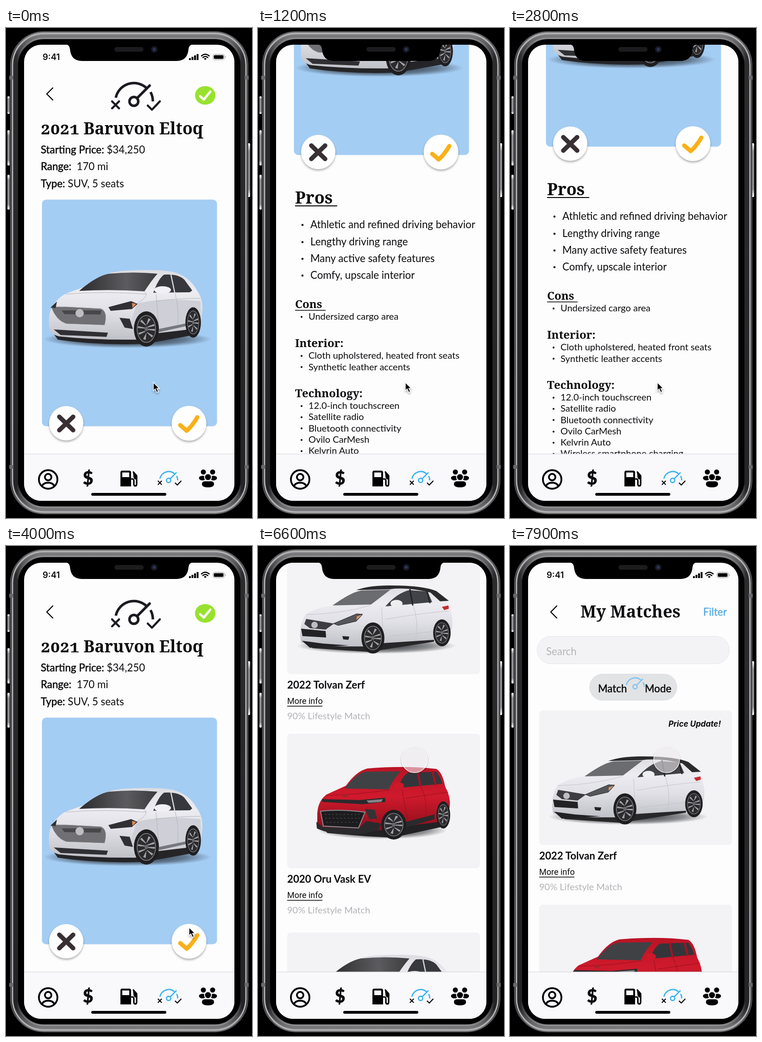
An HTML page that plays this animation: 531 by 1055 pixels, repeating every 8000 ms.

```html
<!DOCTYPE html>
<html lang="en">
<head>
<meta charset="utf-8">
<title>Car match</title>
<style>
html, body { margin: 0; width: 100%; height: 100%; overflow: hidden; background: #000; }
svg { display: block; width: 531px; height: 1055px; }
text { font: 22.3px Lato, sans-serif; fill: #0c0c0e; white-space: pre; }
.med { stroke: #0c0c0e; stroke-width: .55px; }
.title { font: 700 35.5px "Noto Serif", serif; font-variant-numeric: oldstyle-nums; }
.big { font: 700 36px "Noto Serif", serif; }
.sub { font: 700 24px "Noto Serif", serif; }
.item, .dim { font-size: 20px; }
.dim { fill: #b3b3b7; }
.name { font-weight: 700; }
.more { font: 18px Roboto, sans-serif; }
.time { font: 600 18.5px Inter, sans-serif; }
.badge { font: italic 700 17px Inter, sans-serif; }
.line { fill: none; stroke: currentColor; stroke-linecap: round; stroke-linejoin: round; }
.soft { filter: drop-shadow(0 3px 2px rgba(0, 0, 0, .3)); }

.first, .second, .third, .arrow, .touch { animation: 8s step-end infinite; }
.first, .arrow { animation-name: first; }
.second { animation-name: second; }
.third { animation-name: third; }
.touch { animation-name: touch; }
.scroll-a, .scroll-c, .move-arrow, .move-touch { animation: 8s ease-in-out infinite; }
.scroll-a { animation-name: scroll-a; }
.scroll-c { animation-name: scroll-c; }
.move-arrow { animation-name: move-arrow; }
.move-touch { animation-name: move-touch; }

@keyframes first { 0% { opacity: 1 } 56.25%, 100% { opacity: 0 } }
@keyframes second { 0% { opacity: 0 } 56.25% { opacity: 1 } 72.5%, 100% { opacity: 0 } }
@keyframes third { 0% { opacity: 0 } 72.5%, 100% { opacity: 1 } }
@keyframes touch { 0% { opacity: 0 } 56.25%, 100% { opacity: 1 } }
@keyframes scroll-a {
  0%, 4% { transform: translateY(0) }
  14.5%, 16% { transform: translateY(-584px) }
  22%, 36% { transform: translateY(-602px) }
  46%, 100% { transform: translateY(0) }
}
@keyframes scroll-c {
  0%, 76% { transform: translateY(0) }
  82%, 88% { transform: translateY(-368px) }
  97%, 100% { transform: translateY(0) }
}
@keyframes move-arrow {
  0%, 43% { transform: translate(318px, 763px) }
  49%, 100% { transform: translate(395px, 821px) }
}
@keyframes move-touch {
  0%, 60% { transform: translate(395px, 850px) }
  68%, 73% { transform: translate(425px, 163px) }
  76%, 100% { transform: translate(338px, 460px) }
}
</style>
</head>
<body>
<svg viewBox="0 0 531 1055">
<defs>
  <clipPath id="screen"><rect x="39" y="36" width="454" height="982" rx="37"/></clipPath>
  <linearGradient id="rim" x2="0" y2="1">
    <stop stop-color="#8a8a8c"/><stop offset=".05" stop-color="#2c2c2e"/>
    <stop offset=".95" stop-color="#242426"/><stop offset="1" stop-color="#8a8a8c"/>
  </linearGradient>
  <linearGradient id="key" x2="0" y2="1">
    <stop stop-color="#fff"/><stop offset=".15" stop-color="#8b8b8d"/>
    <stop offset=".85" stop-color="#8b8b8d"/><stop offset="1" stop-color="#fff"/>
  </linearGradient>
  <linearGradient id="glass" x2="1" y2="0">
    <stop stop-color="#2b2b2d"/><stop offset=".6" stop-color="#5c5c60"/><stop offset="1" stop-color="#3b3b3e"/>
  </linearGradient>
  <linearGradient id="white" x2="0" y2="1">
    <stop stop-color="#dcdce1"/><stop offset=".3" stop-color="#ececf1"/>
    <stop offset=".6" stop-color="#e0e0e6"/><stop offset="1" stop-color="#c0c0c8"/>
  </linearGradient>
  <linearGradient id="red" x2="0" y2="1">
    <stop stop-color="#b91425"/><stop offset=".45" stop-color="#cf1a2c"/><stop offset="1" stop-color="#860d1a"/>
  </linearGradient>
  <radialGradient id="shade">
    <stop stop-color="#15181c" stop-opacity=".95"/><stop offset=".7" stop-color="#15181c" stop-opacity=".45"/>
    <stop offset="1" stop-color="#15181c" stop-opacity="0"/>
  </radialGradient>

  <g id="wheel">
    <ellipse rx="27" ry="38" fill="#1f1f22"/>
    <ellipse rx="20" ry="29" fill="#2b2b2e" stroke="#85858b" stroke-width="1.500"/>
    <ellipse rx="11" ry="16" fill="none" stroke="#a2a2a8" stroke-width="15" stroke-dasharray="3 8"/>
    <ellipse rx="4" ry="5" fill="#68686c"/>
  </g>

  <g id="sedan">
    <ellipse cx="262" cy="670" rx="182" ry="19" fill="url(#shade)"/>
    <path fill="#252528" d="M98 652L112 671Q200 684 300 680L400 662V640Z"/>
    <path fill="url(#white)" d="M93 643Q91 618 98 603 108 585 126 573 145 566 168 558 205 527 250 523 320 518 360 525 396 534 412 565 424 580 424 605L421 640 387 650 328 657 280 671Q190 672 115 664 95 660 93 643Z"/>
    <path fill="#cfcfd7" d="M282 594Q330 580 420 588L421 640 387 649 328 656 280 670 268 640Z"/>
    <path fill="url(#glass)" d="M158 566Q195 534 222 529 275 524 327 529 313 545 299 567 230 562 158 566Z"/>
    <path fill="#37383e" d="M318 570Q328 541 341 531 372 529 385 542L402 565 397 569Z"/>
    <path class="line" color="#d9d9e0" stroke-width="2.500" d="M356 531L364 569"/>
    <path class="line" color="#b4b4bd" d="M128 573Q210 566 303 573M299 569Q312 575 282 594M323 588Q370 582 419 582M324 574L330 646M365 572Q375 605 370 645"/>
    <path fill="#77777f" d="M330 648L388 636V642L330 655Z"/>
    <ellipse cx="338" cy="564" rx="18" ry="8" fill="#f1f1f5"/>
    <path fill="#707074" stroke="#c9c9ce" d="M97 600L130 600 205 604Q221 611 213 640L130 637Q108 630 97 600Z"/>
    <path fill="#48484b" d="M120 608H206L204 617 126 616Z"/>
    <path fill="#303034" d="M221 601L270 588 284 594 272 605 226 609ZM96 602L110 589 107 603ZM245 624L267 626 274 648 256 645ZM103 649L220 656 217 665 118 661Z"/>
    <path fill="#e58a55" d="M272 592L281 594 273 603Z"/>
    <circle cx="159" cy="614" r="9" fill="#bdbdc3"/>
    <use href="#wheel" transform="translate(303 648)"/>
    <use href="#wheel" transform="translate(404 634) scale(.62 .86)"/>
  </g>

  <g id="hatch">
    <ellipse cx="255" cy="675" rx="172" ry="17" fill="url(#shade)"/>
    <path fill="#27272a" d="M96 660L118 680 240 688 380 666V650Z"/>
    <path fill="url(#white)" d="M91 655Q90 625 104 606 130 592 160 588L187 575Q220 553 250 548 310 542 350 549 388 556 405 575 415 588 416 600 422 620 418 640L380 662 272 669 240 676Q130 678 93 668Z"/>
    <path fill="#2a2a2d" d="M212 555Q240 544 290 545 355 545 385 557L412 578 393 579 372 560Q320 548 285 553Z"/>
    <path fill="#6b6c70" d="M161 588Q200 560 222 556L286 554Q265 570 244 586Z"/>
    <path fill="#424348" d="M275 590Q300 561 327 555L366 558 376 581Z"/>
    <path class="line" color="#222" stroke-width="3" d="M328 554L334 587M365 558L371 582"/>
    <path class="line" color="#c3c3c9" d="M104 608Q180 606 242 588M267 593L270 662M335 588Q348 625 340 662M275 618Q340 606 410 600M280 655L378 644"/>
    <ellipse cx="299" cy="584" rx="13" ry="8" fill="#eeeef1"/>
    <path fill="#3d3d41" d="M104 617L164 627 146 640 112 637 100 628Z"/>
    <path fill="#222225" d="M93 638L146 643 147 657 96 654ZM95 664L140 670 196 674 112 679ZM182 654L197 655 195 662 184 661Z"/>
    <path fill="#55565a" stroke="#222" d="M163 627L213 606 226 607 212 622 173 631Z"/>
    <path fill="#e09a66" d="M213 612L224 608 213 619Z"/>
    <path fill="#c52c30" d="M397 591L411 588 412 595 402 598Z"/>
    <circle cx="122" cy="630" r="7" fill="#bdbdc3"/>
    <use href="#wheel" transform="translate(248 658) scale(.92 .88)"/>
    <use href="#wheel" transform="translate(397 647) scale(.7 .76)"/>
  </g>

  <g id="boxy">
    <ellipse cx="268" cy="612" rx="140" ry="19" fill="url(#shade)"/>
    <path fill="#222225" d="M127 594L150 618 235 625 290 628 405 603V575Z"/>
    <path fill="url(#red)" d="M128 575Q130 548 148 535L190 516Q212 485 236 479 320 472 385 480 398 487 404 518 416 540 414 560L408 592 318 603 230 617Q170 622 128 604Z"/>
    <path fill="#404145" d="M187 522Q212 490 232 486L308 485Q290 505 282 524Z"/>
    <path fill="#34353a" d="M302 521Q312 493 325 488L385 486Q395 500 398 512Z"/>
    <path class="line" color="#a91222" stroke-width="4" d="M345 487L351 517M377 487L384 514"/>
    <path class="line" color="#93101e" d="M148 537Q220 535 284 525M311 525L323 591M352 519Q368 550 361 587M319 543L410 530"/>
    <ellipse cx="304" cy="516" rx="11" ry="7" fill="#cf182a"/>
    <path fill="#2a2a2d" d="M126 594L140 605 218 608 234 592 266 598 260 612 225 620Q160 624 127 608ZM319 594L381 578V588L319 606ZM138 545L220 547 274 542 275 551 226 556 139 551Z"/>
    <path fill="#1c1c1f" stroke="#8b8b90" stroke-width="2" d="M135 571Q175 566 231 573L217 607 141 603Z"/>
    <path class="line" color="#3b3b40" stroke-width="2" stroke-dasharray="2 6" d="M145 578H220M146 586H219M148 595H216"/>
    <path fill="#85848a" d="M234 548L270 545 266 551 239 553Z"/>
    <path fill="#333336" d="M231 566L252 568 257 587 240 588Z"/>
    <ellipse cx="188" cy="538" rx="6" ry="3" fill="#9f2630"/>
    <use href="#wheel" transform="translate(293 600) scale(1 .84)"/>
    <use href="#wheel" transform="translate(400 579) scale(.55 .77)"/>
  </g>

  <g id="gauge" class="line" stroke-width="5.5">
    <path stroke-linecap="butt" d="M-39 -8A40 40 0 0 1 27 -29M36 -20A41 41 0 0 1 41 0"/>
    <circle r="9.5"/>
    <path d="M7 -7L34 -34"/>
  </g>
  <path id="votes-mini" class="line" stroke-width="4.5" d="M-47 0L-32 15M-32 0L-47 15M30 9L39 18 56 0"/>

  <g id="status">
    <text class="time" x="79" y="69">9:41</text>
    <path d="M395 65h4v4h-4zM400.500 62h4v7h-4zM406 59h4v10h-4zM411.500 56h4v13h-4z"/>
    <path class="line" stroke-width="2.600" stroke-linecap="butt" d="M422 60Q430 53 438.500 60M425 63.500Q430 59 435.500 63.500"/>
    <path d="M427 66Q430 63.500 433 66L430 69Z"/>
    <rect x="446.500" y="56.500" width="25" height="12" rx="4" fill="none" stroke="#999"/>
    <rect x="448.500" y="58.500" width="21" height="8" rx="2"/>
    <path fill="#999" d="M473 60Q476 62.500 473 65Z"/>
    <path class="line" stroke-width="2.300" d="M101 129L88 142 101 155"/>
  </g>

  <g id="header">
    <use href="#status"/>
    <g transform="translate(276 158)" color="#1b1a20"><use href="#gauge"/><use href="#votes-mini"/></g>
    <ellipse cx="430" cy="145" rx="22" ry="20" fill="#98e22e"/>
    <path class="line" color="#fff" stroke-width="5" d="M419 147L427 154 441 137"/>
    <text x="75" y="270"><tspan class="med">Starting Price:</tspan> $34,250</text>
    <text x="75" y="306"><tspan class="med">Range:</tspan>  170 mi</text>
    <rect x="77.500" y="369.500" width="378" height="488" rx="9" fill="#a4cdf4"/>
  </g>

  <g id="votes">
    <g class="soft" fill="#fff"><circle cx="130" cy="851" r="37"/><circle cx="395" cy="851" r="37.500"/></g>
    <path class="line" color="#393033" stroke-width="9.500" d="M115 837L145 866M145 837L115 866"/>
    <path class="line" color="#fbb018" stroke-width="9" d="M376 855L390 867Q402 857 413 838"/>
  </g>

  <g id="card">
    <rect x="63" y="354" width="416" height="290" rx="8" fill="#f3f2f5"/>
    <text class="more" x="63" y="708">More info</text>
    <path d="M63 712h76v1.500h-76z"/>
    <text class="dim" x="63" y="741">90% Lifestyle Match</text>
  </g>
</defs>

<!-- phone body -->
<g fill="url(#key)">
  <rect x="3" y="147" width="5" height="38" rx="2"/><rect x="3" y="220" width="5" height="76" rx="2"/>
  <rect x="3" y="316" width="5" height="75" rx="2"/><rect x="522" y="248" width="5" height="116" rx="2"/>
</g>
<rect x="10" y="8" width="512" height="1038" rx="72" fill="url(#rim)" stroke="#5c5c5f" stroke-width="2"/>
<rect x="14" y="12" width="504" height="1030" rx="68" fill="none" stroke="#b4b4b6" stroke-width="3"/>
<rect x="24" y="22" width="484" height="1010" rx="58" fill="#000" stroke="url(#rim)" stroke-width="4"/>
<path fill="#69696c" d="M7 103h9v8H7zM515 103h9v8h-9zM7 941h9v8H7zM515 941h9v8h-9z"/>

<g clip-path="url(#screen)">
  <path fill="#fefdfe" d="M39 36h454v982H39z"/>

  <g class="first"><g class="scroll-a">
    <use href="#header"/>
    <text class="title" x="75" y="229">2021 Baruvon Eltoq</text>
    <text x="75" y="343"><tspan class="med">Type:</tspan> SUV, 5 seats</text>
    <use href="#sedan"/>
    <use href="#votes"/>
    <text class="big" x="80" y="962">Pros</text>
    <path d="M80 966h91v2H80zM80 1191h66v1.500H80z"/>
    <text x="113" y="1015">Athletic and refined driving behavior</text>
    <text x="113" y="1052">Lengthy driving range</text>
    <text x="113" y="1088">Many active safety features</text>
    <text x="113" y="1124">Comfy, upscale interior</text>
    <path class="line" stroke-width="4.500" d="M96 1008h0M96 1045h0M96 1081h0M96 1117h0"/>
    <text class="sub" x="80" y="1187">Cons</text>
    <text class="item" x="109" y="1212">Undersized cargo area</text>
    <text class="sub" x="80" y="1271">Interior:</text>
    <text class="item" x="109" y="1296">Cloth upholstered, heated front seats</text>
    <text class="item" x="109" y="1321">Synthetic leather accents</text>
    <text class="sub" x="80" y="1379">Technology:</text>
    <text class="item" x="109" y="1404">12.0-inch touchscreen</text>
    <text class="item" x="109" y="1428">Satellite radio</text>
    <text class="item" x="109" y="1453">Bluetooth connectivity</text>
    <text class="item" x="109" y="1477">Ovilo CarMesh</text>
    <text class="item" x="109" y="1501">Kelvrin Auto</text>
    <text class="item" x="109" y="1525">Wireless smartphone charging</text>
    <path class="line" stroke-width="4" d="M94 1206h0M94 1290h0M94 1314h0M94 1398h0M94 1422h0M94 1446h0M94 1471h0M94 1495h0M94 1519h0"/>
  </g></g>

  <g class="second">
    <path fill="#fefdfe" d="M39 36h454v982H39z"/>
    <use href="#header" x="1"/>
    <text class="title" x="76" y="229">2022 Tolvan Zerf</text>
    <text x="76" y="343"><tspan class="med">Type:</tspan> Compact Hatchback, 5 seats</text>
    <use href="#hatch"/>
    <use href="#votes" x="1"/>
  </g>

  <g class="third"><g class="scroll-c">
    <use href="#status"/>
    <text class="big" x="152" y="154">My Matches</text>
    <text x="417" y="150" style="fill:#5aace2;stroke:#5aace2;stroke-width:.5px">Filter</text>
    <rect x="58.500" y="194.500" width="415" height="59" rx="29.500" fill="#f3f2f5" stroke="#e4e3e7"/>
    <text x="78" y="235" style="fill:#b5b5b9">Search</text>
    <rect x="171" y="275" width="190" height="58" rx="29" fill="#e2e3e5"/>
    <text class="med" x="190" y="315">Match</text>
    <text class="med" x="291" y="315">Mode</text>
    <use href="#gauge" color="#80c4f3" transform="translate(270 303) scale(.48)"/>
    <use href="#card"/>
    <text class="badge" x="342" y="389">Price Update!</text>
    <use href="#hatch" y="-92"/>
    <text class="name" x="63" y="675">2022 Tolvan Zerf</text>
    <use href="#card" y="418"/>
    <use href="#boxy" y="368"/>
    <text class="name" x="63" y="1093">2020 Oru Vask EV</text>
    <use href="#card" y="846"/>
    <use href="#sedan" y="727"/>
  </g></g>

  <!-- tab bar -->
  <path fill="#f9f8fb" d="M39 917h454v101H39z"/>
  <path fill="#d2d1d6" d="M39 916.500h454v1H39z"/>
  <g class="line" stroke-width="3.800">
    <circle cx="91" cy="972" r="20"/><circle cx="91" cy="967" r="7"/>
    <path d="M78 986Q81 979 91 979T104 986"/>
  </g>
  <text x="177" y="983" text-anchor="middle" style="font-size:39px;font-weight:900">$</text>
  <path fill-rule="evenodd" d="M251 953h15q4 0 4 4v30h-23v-30q0-4 4-4zM251 957v10h15v-10z"/>
  <path class="line" stroke-width="3.200" d="M271 971h2q3 0 3 4v7q0 4 3 4t3-4v-18l-7-8"/>
  <path d="M274 956l9 7v9h-4q-4-2-4-7z"/>
  <g transform="translate(351 974) scale(.48)">
    <use href="#gauge" color="#35b2ee"/><use href="#votes-mini" y="3"/>
  </g>
  <g stroke="#f9f8fb" stroke-width="2">
    <circle cx="426" cy="956" r="6.500"/><circle cx="446" cy="956" r="6.500"/>
    <ellipse cx="424" cy="969" rx="8.500" ry="6"/><ellipse cx="448" cy="969" rx="8.500" ry="6"/>
    <circle cx="436" cy="967" r="7.500"/>
    <path d="M422 982q0-7 7-7h14q7 0 7 7 0 8-14 8t-14-8z"/>
  </g>
  <rect x="184" y="1001" width="162" height="6" rx="3"/>
</g>

<!-- notch -->
<path d="M128 35Q137 36 138 45 140 71 164 71H368Q392 71 394 45 395 36 404 35Z"/>
<rect x="234" y="41" width="63" height="10" rx="5" fill="#1c1c1e"/>
<circle cx="320" cy="46" r="7" fill="#191a24"/><circle cx="320" cy="46" r="3" fill="#2a3a62"/>

<g class="arrow"><g class="move-arrow">
  <path class="soft" stroke="#fff" stroke-width="1.500" d="M0 0V18L4 14 7.500 21.500 11 20 7.500 13H13Z"/>
</g></g>
<g class="touch"><g class="move-touch" fill="none">
  <circle cy="1.500" r="29" stroke="#000" stroke-opacity=".1" stroke-width="3"/>
  <circle r="28" fill="#eeecee" fill-opacity=".6" stroke="#fff" stroke-opacity=".85" stroke-width="1.500"/>
</g></g>
</svg>
</body>
</html>
```
